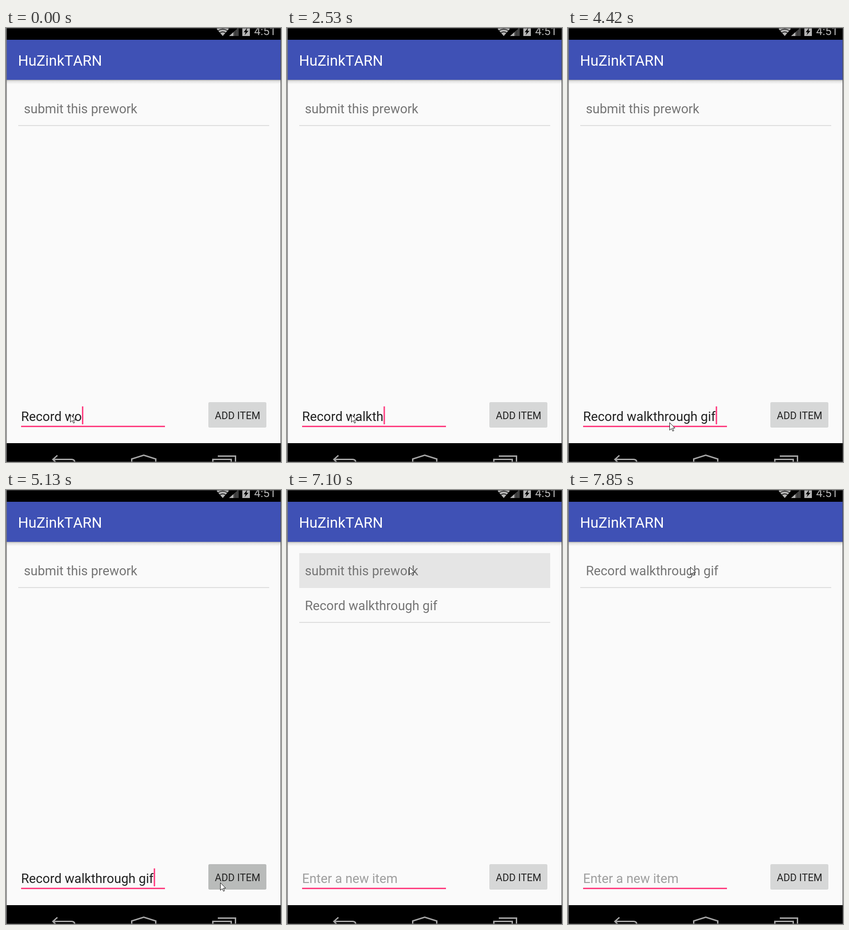
Recreate the animation shown at these times as an HTML page. Size 583 px wide and 921 px high, loop 8 s.

```html
<!DOCTYPE html>
<html lang="en">
<head>
<meta charset="utf-8">
<title>To-do list</title>
<style>
  html, body { margin: 0; width: 100%; height: 100%; overflow: hidden; background: #fafafa; }
  svg { display: block; width: 583px; height: 921px; }
  text { font: 27.3px Roboto, sans-serif; font-kerning: none; white-space: pre; }
  .item { fill: #757575; }
  .line { fill: #dedede; }
  .nav { fill: none; stroke: #a6a6a6; stroke-width: 3; }
</style>
</head>
<body>
<svg viewBox="0 0 583 921">
  <defs>
    <linearGradient id="shade" x1="0" y1="0" x2="0" y2="1">
      <stop offset="0" stop-color="#000" stop-opacity=".3"/>
      <stop offset=".3" stop-color="#000" stop-opacity=".1"/>
      <stop offset="1" stop-color="#000" stop-opacity="0"/>
    </linearGradient>
  </defs>
  <rect width="583" height="921" fill="#fafafa"/>

  <!-- status bar -->
  <rect width="583" height="25" fill="#000"/>
  <path d="M459.500 17L446.500 2Q459.500 -7 472.500 2Z" fill="#b4b4b4"/>
  <path d="M449 6Q459.500 -1 470 6M453 10.500Q459.500 6 466 10.500" fill="none" stroke="#000" stroke-width="1.300"/>
  <path d="M473 17H493V-1Z" fill="#4c4c4c"/>
  <path d="M473 17H482V9Z" fill="#b4b4b4"/>
  <path d="M486.500 5V17M490 2V17" stroke="#222"/>
  <rect x="501" y="-2" width="16" height="19" fill="#b4b4b4"/>
  <path d="M511 0L504 9H508L506 15L514 6H510Z" fill="#000"/>
  <text x="526" y="15" fill="#b4b4b4" style="font-size:24px">4:51</text>

  <!-- toolbar -->
  <rect y="110" width="583" height="9" fill="url(#shade)"/>
  <rect y="25" width="583" height="85" fill="#3f51b5"/>
  <text x="25.500" y="79.500" fill="#fff" style="font-size:31px">HuZinkTARN</text>

  <!-- list -->
  <rect class="line" x="26" y="206" width="532" height="2"/>
  <rect id="press" x="26" y="134" width="532" height="74"/>
  <text id="row1" class="item" x="38" y="180.500"></text>
  <g id="row2">
    <text class="item" x="38" y="254.500">Record walkthrough gif</text>
    <rect class="line" x="26" y="280" width="532" height="2"/>
  </g>

  <!-- input and button -->
  <text id="field" x="32" y="833.500"></text>
  <rect x="32" y="844" width="305" height="3" fill="#ff4081"/>
  <rect id="caret" y="803" width="3" height="38" fill="#ff4081"/>
  <rect id="button" x="429" y="794" width="123" height="54" rx="3"/>
  <text x="491" y="829.500" fill="#212121" text-anchor="middle" style="font-size:21.300px">ADD ITEM</text>

  <!-- navigation bar -->
  <rect y="881" width="583" height="40" fill="#000"/>
  <path class="nav" d="M109 907L99.500 915.500L108 924M99.500 915.500H139Q146 915.500 146 923"/>
  <path class="nav" d="M266.500 923V914.500L292 906.500L317.500 914.500V923"/>
  <path class="nav" d="M438.500 923V915.500H477.500V923M449 908.500H486.500V923"/>

  <!-- window edge -->
  <path d="M0 .5H583M0 920.500H583M582.500 0V921" stroke="#4a4a4a"/>
  <rect width="1.600" height="921" fill="#7c7c7c"/>

  <path id="pointer" d="M.5 .5V16.500L4.400 13L7 18.500L9.300 17.500L6.800 12H11.800Z" fill="#fff" stroke="#111"/>
</svg>
<script>
const LOOP = 8000;
const $ = id => document.getElementById(id);
const [press, row1, row2, field, caret, button, pointer] =
  ['press', 'row1', 'row2', 'field', 'caret', 'button', 'pointer'].map($);

// Each track is a list of [start time, value]; values hold until the next start.
const typing = [
  [0, 'wo'], [120, 'wa'], [320, 'wal'], [610, 'walk'],
  [1040, 'walkth'], [1170, 'walktho'], [1430, 'walkthoru'], [1560, 'walkthorugh'],
  [1970, 'walkthorug'], [2100, 'walkthoru'], [2240, 'walkthor'], [2390, 'walktho'],
  [2530, 'walkth'], [2660, 'walkthr'], [2800, 'walkthro'], [2930, 'walkthroug'],
  [3070, 'walkthrough'], [3200, 'walkthrough '], [3330, 'walkthrough g'],
  [3460, 'walkthrough gi'], [4000, 'walkthrough gif'], [5400, '']
];
const blink = [
  [0, true], [4555, false], [4970, true], [5850, false],
  [6380, true], [6810, false], [7410, true], [7850, false]
];
const path = [
  [0, [136, 820]], [4420, [215, 837]], [4555, [418, 837]], [4690, [454, 833]],
  [5720, [363, 565]], [5850, [345, 240]], [5980, [332, 109]],
  [6110, [293, 137]], [6240, [268, 157]], [6380, [259, 163]]
];
const buttonFill = [[0, '#d6d7d7'], [4970, '#c8c9c9'], [5130, '#b9bbba'], [5400, '#d6d7d7']];
const rowFill = [[0, 'none'], [7100, '#e5e5e5'], [7700, '#f0f0f0'], [7850, 'none']];

const at = (track, t) => track.findLast(step => step[0] <= t)[1];
const show = (el, on) => el.setAttribute('visibility', on ? 'visible' : 'hidden');
const setText = (el, s) => { if (el.textContent !== s) el.textContent = s; };

function draw(t) {
  const word = at(typing, t);
  const removed = t >= 7560;
  setText(field, word ? 'Record ' + word : 'Enter a new item');
  field.setAttribute('fill', word ? '#212121' : '#9e9e9e');
  caret.setAttribute('x', word ? 32.3 + field.getComputedTextLength() : 32.5);
  show(caret, at(blink, t));

  setText(row1, removed ? 'Record walkthrough gif' : 'submit this prework');
  show(row2, t >= 5400 && !removed);
  press.setAttribute('fill', at(rowFill, t));
  button.setAttribute('fill', at(buttonFill, t));
  pointer.setAttribute('transform', `translate(${at(path, t)})`);
}

const start = performance.now();
function tick() {
  draw((performance.now() - start) % LOOP);
  requestAnimationFrame(tick);
}
tick();
</script>
</body>
</html>
```
